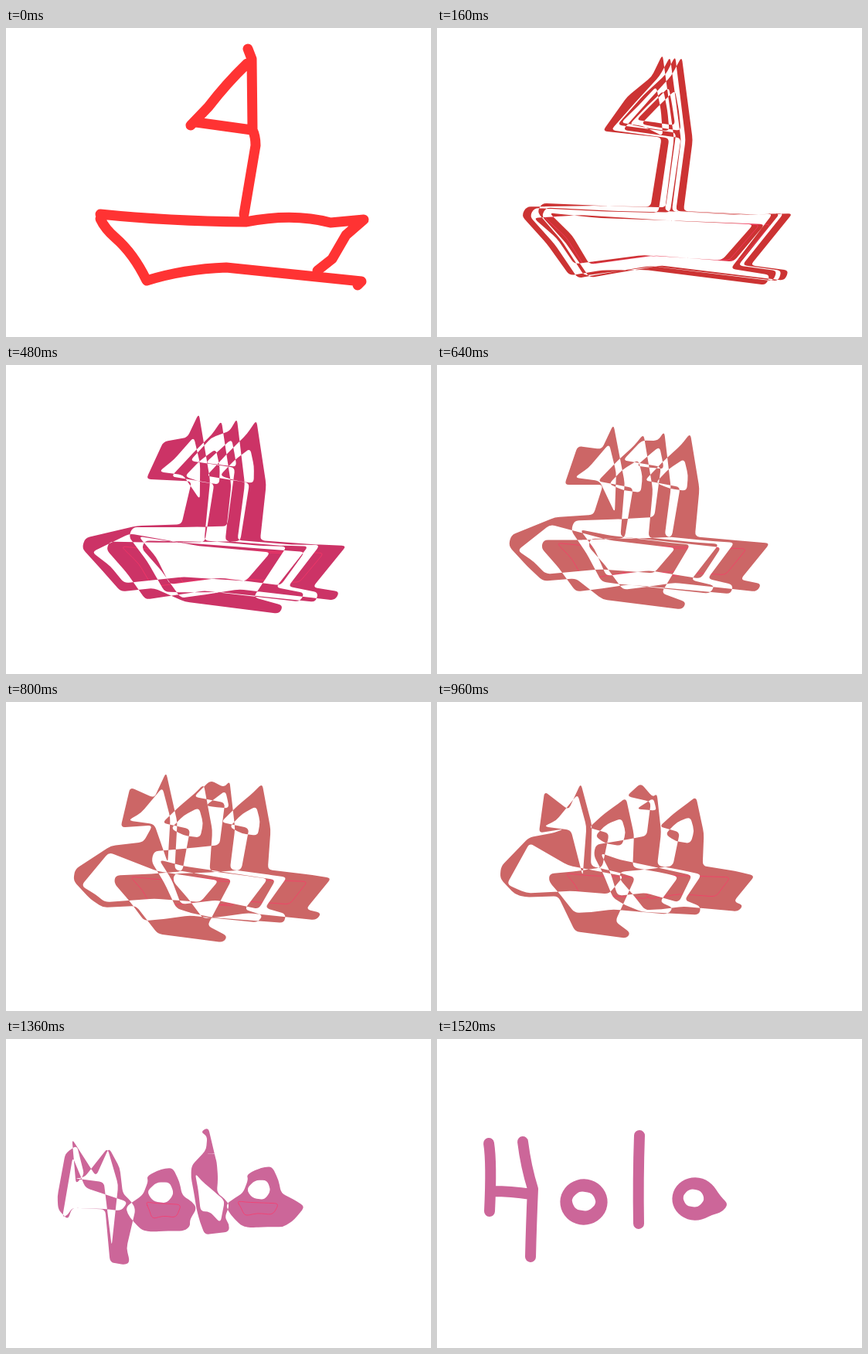
These frames come from a looping animation (550 px wide and 400 px high, 1.6 s). An HTML page with a canvas:

```html
<!DOCTYPE html>
<html lang="en">
<head>
<meta charset="utf-8">
<title>Boat to Hola</title>
<style>
html, body { margin: 0; width: 100%; height: 100%; overflow: hidden; background: #fff; }
canvas { display: block; }
</style>
</head>
<body>
<canvas width="550" height="400"></canvas>
<script>
const ctx = document.querySelector('canvas').getContext('2d');
const STEP = 80, LAST = 19;

// Brush drawings that open and close the loop
const boatLines = new Path2D(`M308 241Q314 205 323 152Q323 140 319 132L318 40L313 27
  M312 46Q285 72 262 102L239 126M246 122L318 132
  M122 241Q210 250 310 251Q372 239 420 252L463 248L440 268L422 299L403 314
  M122 247Q128 260 142 272Q165 292 182 327Q230 312 285 310L460 328L455 333`);
const barLines = new Path2D(`M67 135Q71 160 68 223M72 197Q95 197 122 201
  M111 133Q115 165 124 194Q122 240 121 282M262 125Q260 180 261 239`);

const points = text => text.split(' ').map(pair => pair.split(',').map(Number));

// Key corners of the boat, clockwise from the mast top
const boat = points('313,20 328,140 314,242 417,246 470,243 410,317 467,324 462,338 285,316 225,326 ' +
  '183,334 150,285 115,246 122,235 220,241 301,244 316,137 231,126 268,83 299,48');
const sail = points('258,115 281,91 304,67 309,95 313,123 285,119');
const hull = points('132,248 200,254 330,257 443,260 398,311 285,304 190,317 165,278');

// The same corners, where they end up in the H
const hBoat = points('112,155 126,170 132,195 133,207 132,218 126,265 124,284 119,287 117,286 117,208 ' +
  '74,205 72,228 62,218 60,200 60,137 67,125 76,180 74,195 64,135 95,193');
const hSail = points('68,188 80,190 111,150 126,200 116,285 108,193');
const hHull = points('66,229 73,141 76,185 124,205 120,212 108,210 73,207 70,222');

// Spreads the corners evenly around an ellipse, with an optional tail
function ring(count, cx, cy, rx, ry, start, tail = 0) {
  return Array.from({ length: count }, (_, i) => {
    const angle = (start + i * 360 / count) * Math.PI / 180;
    const r = 1 + tail * Math.exp(-((i - 4.3) ** 2));
    return [cx + rx * r * Math.cos(angle), cy + ry * r * Math.sin(angle)];
  });
}

// Runs down the right side of the l and up its left side
const lBoat = boat.map((_, i) => {
  const right = i > 18 ? i - 20 : i;
  if (right < 8) return [268, 176 + 9 * right];
  const k = (i - 8) / 10;
  return [k === 1 ? 261 : 254, 246 - 128 * Math.sin(k * Math.PI / 2)];
});
const lSail = sail.map(([x, y]) => [258 + (x - 258) / 6, 158 - (y - 67) / 8]);
const lHull = hull.map(([x, y]) => [258 + (x - 132) / 50, 165 + (x - 132) * 0.1 + (y - 248) * 0.6]);

const o = ring(20, 190, 211, 31, 30, -62);
const oHole = ring(6, 190, 210, 17, 14, 190);
const a = ring(20, 334, 207, 30, 28, -62, 0.5);
const aHole = ring(6, 332, 206, 15, 13, 190);

const oSeam = hull.map(([x, y]) => [186 + (x - 132) * 0.05, 206 + (y - 248) * 0.25]);
const aSeam = hull.map(([x, y]) => [318 + (x - 132) * 0.08, 205 + (y - 248) * 0.2]);

const fills = [[boat, hBoat], [sail, hSail], [hull, hHull], [boat, o], [sail, oHole],
  [boat, lBoat], [sail, lSail], [hull, lHull], [boat, a], [sail, aHole]];
const seams = [[hull, oSeam], [hull, aSeam]];

const mix = (p, q, t) => [p[0] + (q[0] - p[0]) * t, p[1] + (q[1] - p[1]) * t];
const morph = (pairs, t) => pairs.map(([from, to]) => from.map((p, i) => mix(p, to[i], t)));

// Closed outlines with slightly rounded corners
function shape(outlines) {
  const path = new Path2D();
  for (const p of outlines) {
    const n = p.length;
    const toward = (c, q) => mix(c, q, Math.min(0.5, 6 / (Math.hypot(q[0] - c[0], q[1] - c[1]) || 1)));
    p.forEach((corner, i) => {
      const before = toward(corner, p[(i + n - 1) % n]);
      if (i) path.lineTo(...before); else path.moveTo(...before);
      path.quadraticCurveTo(...corner, ...toward(corner, p[(i + 1) % n]));
    });
    path.closePath();
  }
  return path;
}

// The tint moves in steps of a coarse palette
const tint = i => `rgb(${i < 2 ? 255 : 204},${i < 7 ? 51 : 102},${i < 5 ? 51 : i < 15 ? 102 : 153})`;

function brush(path, width) {
  ctx.lineWidth = width;
  ctx.stroke(path);
}

function draw(i) {
  ctx.clearRect(0, 0, 550, 400);
  ctx.fillStyle = ctx.strokeStyle = tint(i);
  ctx.lineCap = ctx.lineJoin = 'round';
  if (i === 0) {
    brush(boatLines, 13);
  } else if (i === LAST) {
    brush(barLines, 14);
    ctx.fill(shape([o, oHole, a, aHole]), 'evenodd');
  } else {
    const t = i / LAST;
    ctx.fill(shape(morph(fills, t)), 'evenodd');
    // Closed hull openings leave hairline seams on the fill
    ctx.globalCompositeOperation = 'source-atop';
    ctx.strokeStyle = '#f36';
    brush(shape(morph(seams, t)), 0.7);
    ctx.globalCompositeOperation = 'source-over';
  }
}

function tick() {
  draw(Math.floor(performance.now() / STEP) % (LAST + 1));
  requestAnimationFrame(tick);
}
tick();
</script>
</body>
</html>
```
